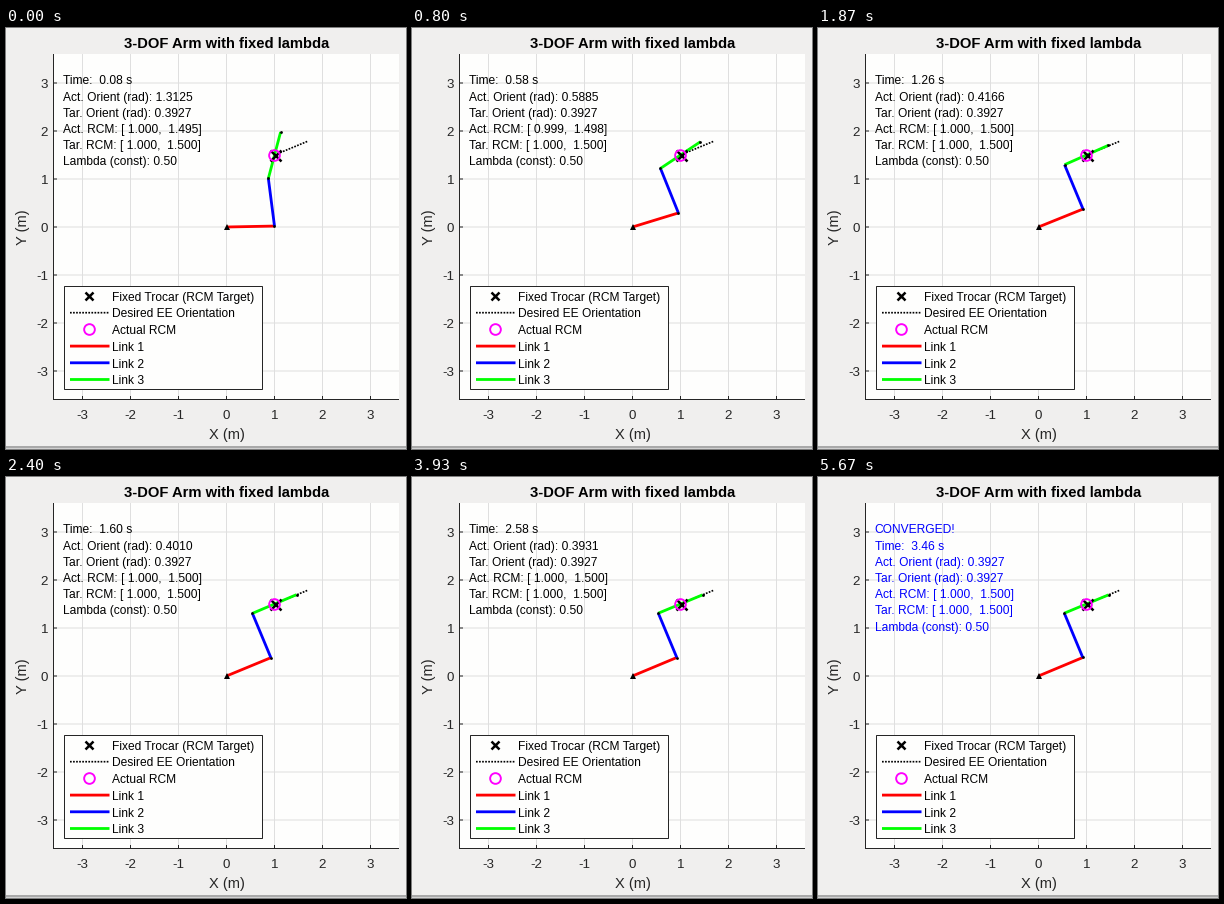
These frames come from a looping animation (400 px wide and 421 px high, 5.74 s). A matplotlib script:

```python
import numpy as np
import matplotlib.pyplot as plt
from matplotlib.animation import FuncAnimation
from matplotlib.patches import Rectangle

W, H, DPI = 400, 421, 64
PT = 72 / DPI                      # points per pixel
FRAMES, INTERVAL = 287, 20
DT, K_ROT, K_RCM, LAM = 0.02, 3.0, 5.0, 0.5
GOAL_ANGLE, GOAL_RCM = np.pi / 8, np.array([1.0, 1.5])
LAST_STEP, LAST_SHOT = 173, 80     # convergence step, and the shot that shows it
UNIT, X0, Y0 = 48, 220.5, 199      # pixels per metre, pixel of the origin
LEFT, RIGHT, TOP, BOTTOM = 47.5, 393, 26, 371.5
DARK, PAPER = "#262626", "#fefefd"

plt.rcParams["font.family"] = "Liberation Sans"
plt.rcParams["path.snap"] = False


def unit(a):
    return np.array([np.cos(a), np.sin(a)])


def normal(a):
    return np.array([-np.sin(a), np.cos(a)])


def simulate():
    """Euler steps of the resolved-rate controller, in absolute link angles."""
    q = np.array([0, np.pi / 2, np.pi / 2])
    path = [q]
    for _ in range(LAST_STEP):
        rcm = unit(q[0]) + unit(q[1]) + LAM * unit(q[2])
        spin = K_ROT * (GOAL_ANGLE - q[2])
        pull = K_RCM * (GOAL_RCM - rcm) - LAM * normal(q[2]) * spin
        rates = np.linalg.solve(np.column_stack([normal(q[0]), normal(q[1])]), pull)
        q = q + DT * np.append(rates, spin)
        path.append(q)
    return path


PATH = simulate()

fig = plt.figure(figsize=(W / DPI, H / DPI), dpi=DPI, facecolor="#f0efee")
ax = fig.add_axes([0, 0, 1, 1])
ax.set_xlim(0, W)
ax.set_ylim(H, 0)
ax.axis("off")


def to_px(p):
    p = np.asarray(p, float)
    return X0 + UNIT * p[..., 0], Y0 - UNIT * p[..., 1]


def box(x, y, w, h, fill, edge="none", z=0):
    ax.add_patch(Rectangle((x, y), w, h, fc=fill, ec=edge, lw=PT, zorder=z))


def line(x, y, color, width, z, **kw):
    return ax.plot(x, y, color=color, lw=width * PT, zorder=z,
                   solid_capstyle="butt", **kw)[0]


def mark(x, y, shape, size, z, color="black", edge=0.0, **kw):
    return ax.plot(x, y, shape, ms=size * PT, mec=color, mew=edge * PT,
                   zorder=z, **kw)[0]


def label(x, y, s, size, color="black", z=10, **kw):
    return ax.text(x, y, s, fontsize=size * PT, color=color, zorder=z,
                   va=kw.pop("va", "baseline"), **kw)


def cross(x, y, size, z):
    mark(x, y, "x", size, z, edge=2.5)


def ring(x, y, z):
    return mark(x, y, "o", 10.7, z, "magenta", 1.9, mfc="none")


def dotted(x, y, z):
    line(x, y, "black", 1.7, z, ls=(0, (1, 0.8)), dash_capstyle="butt")


# Window edge, plot area, grid and ticks
box(0, 418, W, 2, "#a9a9a9")
box(0, 420, W, 1, "#d0d0d0")
box(LEFT, TOP, RIGHT - LEFT, BOTTOM - TOP, PAPER)
for v in range(-3, 4):
    gx, gy = X0 + UNIT * v, Y0 - UNIT * v
    line([gx, gx], [TOP, BOTTOM], "#dfdfdf", 1, 1)
    line([LEFT, RIGHT], [gy, gy], "#dfdfdf", 1, 1)
    line([gx, gx], [BOTTOM - 3.5, BOTTOM], DARK, 1, 2)
    line([LEFT, LEFT + 3.5], [gy, gy], DARK, 1, 2)
    label(gx, 391, str(v), 13.33, DARK, ha="center")
    label(42, gy + 4.8, str(v), 13.33, DARK, ha="right")
line([LEFT, LEFT], [TOP, BOTTOM + 0.5], DARK, 1, 2)
line([LEFT, RIGHT], [BOTTOM, BOTTOM], DARK, 1, 2)

label(220.5, 20.3, "3-DOF Arm with fixed lambda", 14.75, weight="bold", ha="center")
label(220.5, 411, "X (m)", 14.67, DARK, ha="center")
label(17, 199, "Y (m)", 14.67, DARK, ha="center", va="center", rotation=90)

# Legend
LINKS = ["red", "blue", "lime"]
box(58.5, 258.5, 198, 103, PAPER, DARK, 8)
names = ["Fixed Trocar (RCM Target)", "Desired EE Orientation", "Actual RCM",
         "Link 1", "Link 2", "Link 3"]
rows = [268 + 16.7 * i for i in range(6)]
for name, y in zip(names, rows):
    label(106, y + 4.7, name, 12)
cross(83.3, rows[0], 8.5, 9)
dotted([64, 103.5], [rows[1]] * 2, 9)
ring(83.3, rows[2], 9)
for color, y in zip(LINKS, rows[3:]):
    line([64, 103.5], [y, y], color, 2.8, 9)

# Fixed parts of the scene
mark(X0, Y0, "^", 5.5, 7, mfc="black")
cross(*to_px(GOAL_RCM), 11, 6)
dotted(*to_px([GOAL_RCM, GOAL_RCM + 0.75 * unit(GOAL_ANGLE)]), 3)

# Moving parts
rcm_ring = ring(0, 0, 7)
arm = [line([], [], c, 2.8, 4) for c in LINKS]
joints = mark([], [], "o", 2.8, 5, mfc="black")
info = [label(56.8, 56.4 + 16.2 * i, "", 12) for i in range(7)]


def draw(i):
    shot = (i * INTERVAL + 14) * 15 // 1000      # 15 shots a second
    done = shot >= LAST_SHOT
    step = LAST_STEP if done else int((0.086 + 0.0426 * shot) / DT)
    q = PATH[step]

    pts = np.vstack([[0, 0], np.cumsum([unit(a) for a in q], axis=0)])
    rcm = pts[2] + LAM * unit(q[2])
    x, y = to_px(pts)
    for j, link in enumerate(arm):
        link.set_data(x[j:j + 2], y[j:j + 2])
    joints.set_data(x[1:], y[1:])
    cx, cy = to_px(rcm)
    rcm_ring.set_data([cx], [cy])

    lines = [
        f"Time: {step * DT:5.2f} s",
        f"Act. Orient (rad): {q[2]:.4f}",
        f"Tar. Orient (rad): {GOAL_ANGLE:.4f}",
        f"Act. RCM: [{rcm[0]:6.3f}, {rcm[1]:6.3f}]",
        f"Tar. RCM: [{GOAL_RCM[0]:6.3f}, {GOAL_RCM[1]:6.3f}]",
        f"Lambda (const): {LAM:.2f}",
    ]
    lines = ["CONVERGED!"] + lines if done else lines + [""]
    for row, text in zip(info, lines):
        row.set_text(text)
        row.set_color("blue" if done else "black")
    return [*arm, joints, rcm_ring, *info]


anim = FuncAnimation(fig, draw, frames=FRAMES, interval=INTERVAL,
                     repeat=True, repeat_delay=0, blit=False)
plt.show()
```
